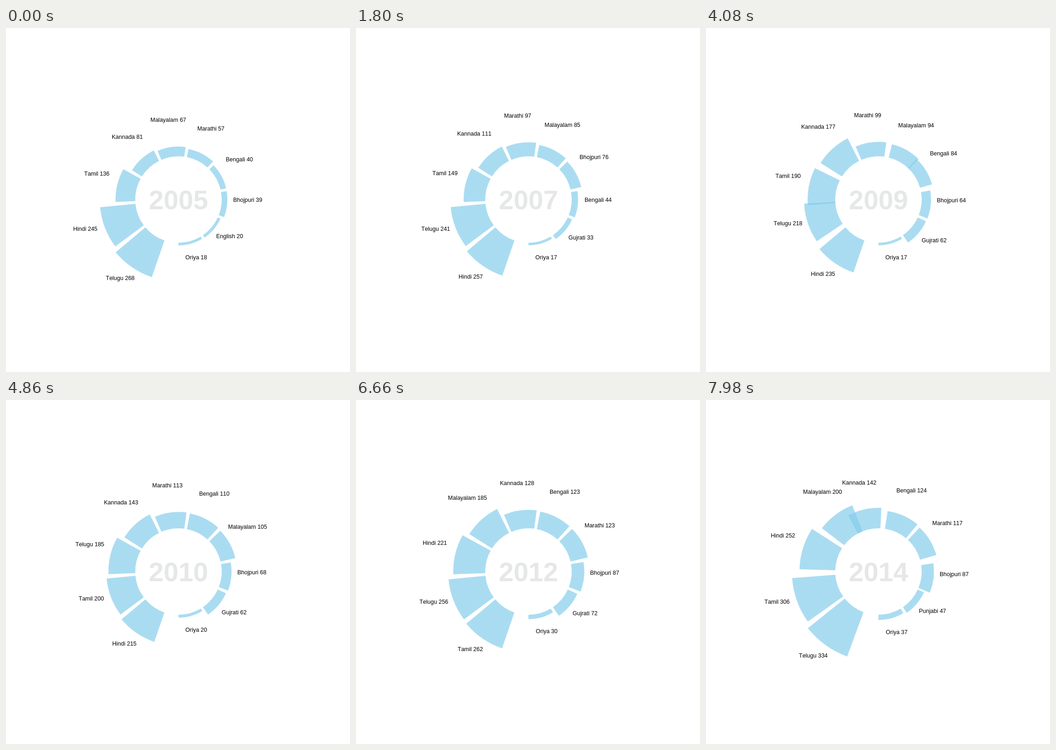
Write an HTML page with a canvas that moves like this. It is 748 by 748 pixels and loops after 8000 ms.

```html
<!DOCTYPE html>
<html lang="en">
<head>
<meta charset="utf-8">
<title>Films by language</title>
<style>
html, body { margin: 0; width: 100%; height: 100%; overflow: hidden; background: #fff; }
canvas { display: block; }
</style>
</head>
<body>
<canvas id="stage" width="748" height="748"></canvas>
<script>
// One line per year, smallest first; the position in the line is the rank.
const years = [
  'Oriya 18,English 20,Bhojpuri 39,Bengali 40,Marathi 57,Malayalam 67,Kannada 81,Tamil 136,Hindi 245,Telugu 268',
  'Oriya 18,Gujrati 28,Bengali 42,Bhojpuri 65,Malayalam 72,Marathi 80,Kannada 87,Tamil 162,Hindi 230,Telugu 245',
  'Oriya 17,Gujrati 33,Bengali 44,Bhojpuri 76,Malayalam 85,Marathi 97,Kannada 111,Tamil 149,Telugu 241,Hindi 257',
  'Oriya 20,Gujrati 49,Bengali 66,Bhojpuri 68,Malayalam 88,Marathi 116,Kannada 162,Tamil 175,Hindi 248,Telugu 286',
  'Oriya 17,Gujrati 62,Bhojpuri 64,Bengali 84,Malayalam 94,Marathi 99,Kannada 177,Tamil 190,Telugu 218,Hindi 235',
  'Oriya 20,Gujrati 62,Bhojpuri 68,Malayalam 105,Bengali 110,Marathi 113,Kannada 143,Telugu 185,Tamil 200,Hindi 215',
  'Oriya 38,Gujrati 59,Bhojpuri 74,Malayalam 95,Marathi 107,Bengali 122,Kannada 138,Tamil 185,Telugu 192,Hindi 206',
  'Oriya 30,Gujrati 72,Bhojpuri 87,Marathi 123,Bengali 123,Kannada 128,Malayalam 185,Hindi 221,Telugu 256,Tamil 262',
  'Oriya 15,Bhojpuri 18,Malayalam 24,Gujrati 28,Hindi 114,Marathi 117,Bengali 120,Tamil 125,Telugu 128,Kannada 132',
  'Oriya 37,Punjabi 47,Bhojpuri 87,Marathi 117,Bengali 124,Kannada 142,Malayalam 200,Hindi 252,Tamil 306,Telugu 334'
].map(line => new Map(line.split(',').map((label, rank) => {
  const [name, value] = label.split(' ');
  return [name, { label, rank, value: +value }];
})));

const LOOP = 8000, STATE = 900, STEP = 30;
const CX = 375, CY = 373, HOLE = 94, SCALE = 0.315;
const SLOT = Math.PI * 2 / 10.45, BAR = 0.9;
const LABEL_GAP = 45.3, LABEL_LIFT = 9.6;

const ctx = document.getElementById('stage').getContext('2d');
ctx.fontKerning = 'none';

const mix = (a, b, e) => a + (b - a) * e;
const ease = p => p < 0.5 ? 4 * p ** 3 : 1 - 4 * (1 - p) ** 3;

// Angles run counterclockwise from the bottom of the ring.
function drawBar({ rank, value }) {
  const from = Math.PI / 2 - rank * SLOT;
  const to = from - BAR * SLOT;
  ctx.beginPath();
  ctx.arc(CX, CY, HOLE + value * SCALE, from, to, true);
  ctx.arc(CX, CY, HOLE, to, from);
  ctx.fill();
}

function drawLabel({ label, rank, value }) {
  const angle = (rank + BAR / 2) * SLOT;
  const r = HOLE + value * SCALE + LABEL_GAP;
  const x = CX + r * Math.sin(angle) - ctx.measureText(label).width / 2;
  ctx.fillText(label, Math.floor(x), Math.round(CY + r * Math.cos(angle) - LABEL_LIFT));
}

// Shared languages glide; the others appear or vanish halfway.
function blend(a, b, e) {
  const late = e >= 0.5, near = late ? b : a, far = late ? a : b;
  return [...near].map(([name, item]) => {
    if (!far.has(name)) return item;
    const p = a.get(name), q = b.get(name);
    return {
      label: item.label,
      rank: mix(p.rank, q.rank, e),
      value: mix(p.value, q.value, e)
    };
  });
}

function draw(t) {
  const state = Math.floor(t / STATE);
  const frame = Math.floor((t % STATE) / STEP);
  const hold = state ? 11 : 10;
  const e = ease(Math.max(0, frame - hold) / (30 - hold));
  const items = blend(years[state], years[state + 1], e);

  ctx.fillStyle = '#fff';
  ctx.fillRect(0, 0, 748, 748);

  ctx.fillStyle = 'rgba(135, 206, 235, 0.7)';
  items.forEach(drawBar);

  ctx.fillStyle = '#e6e7e7';
  ctx.font = 'bold 58px "Liberation Sans", Arial, sans-serif';
  ctx.textAlign = 'center';
  ctx.fillText(2005 + state + (e >= 0.5), CX, 394);

  ctx.fillStyle = '#000';
  ctx.font = '12.5px "Liberation Sans", Arial, sans-serif';
  ctx.textAlign = 'left';
  items.forEach(drawLabel);
}

const start = performance.now();
function tick() {
  draw((performance.now() - start) % LOOP);
  requestAnimationFrame(tick);
}
tick();
</script>
</body>
</html>
```
